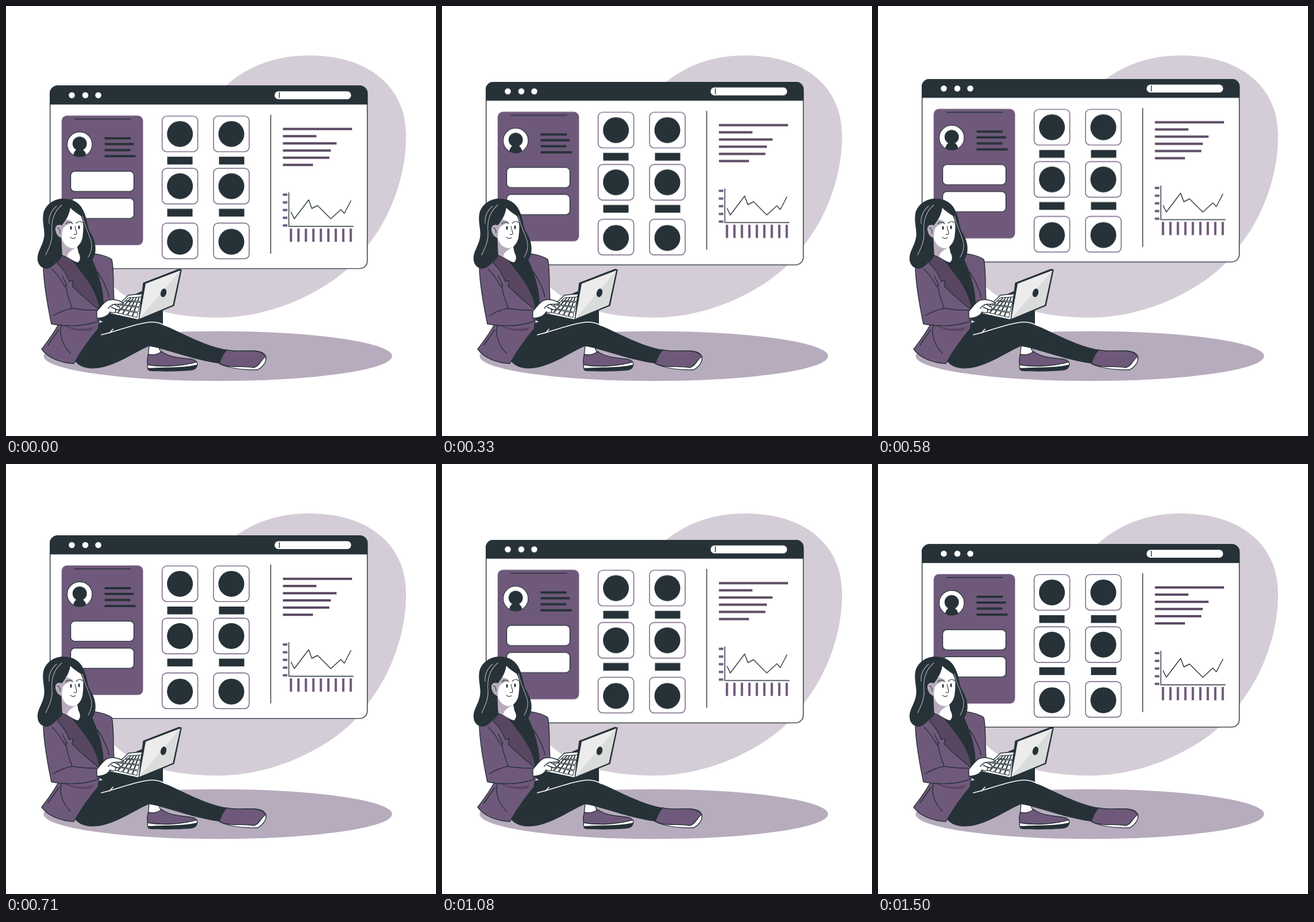
Recreate the animation shown at these times as an HTML page. Size 748 by 748 pixels, loop 1540 ms.

```html
<!DOCTYPE html>
<html lang="en">
<head>
<meta charset="utf-8">
<title>Social dashboard</title>
<style>
  html, body { margin: 0; width: 100%; height: 100%; overflow: hidden; background: #fff; }
  svg { display: block; width: 100vw; height: 100vh; }
  .dark { fill: #263238; }
  .plum { fill: #6f597b; }
  .deep { fill: #594762; }
  .mist { fill: #b7acbd; }
  .white { fill: #fff; }
  .ink { stroke: #263238; stroke-width: 1.4; stroke-linejoin: round; stroke-linecap: round; }
  .rim { fill: #fff; stroke: #6f597b; stroke-width: 1.4; }
  .line { fill: none; }
  .thin { stroke-width: 1.1; }
  .bar { stroke-width: 4; fill: none; }
  .shine { fill: none; stroke: #b7acbd; stroke-width: 1.1; stroke-linecap: round; }
</style>
</head>
<body>
<svg viewBox="0 0 748 748">
  <path fill="#d4cdd7" d="M382 139C425 101 475 86 528 86C630 86 696 140 696 225C696 300 666 370 632 413C592 480 478 542 370 542C290 542 225 525 187 488C150 450 150 300 382 139Z"/>
  <ellipse class="mist" cx="368.5" cy="609" rx="303" ry="43.3"/>

  <g id="panel">
    <rect class="white ink" x="76.7" y="140" width="551.8" height="317.6" rx="13"/>
    <path class="dark ink" d="M76.7 171.5V153A13 13 0 0 1 89.7 140H615.5A13 13 0 0 1 628.5 153V171.5Z"/>
    <g class="white">
      <circle cx="114.5" cy="156" r="5.3"/><circle cx="138" cy="156" r="5.3"/><circle cx="160.5" cy="156" r="5.3"/>
      <rect x="467.3" y="149.2" width="133" height="13.8" rx="6.6"/>
    </g>
    <path class="ink line" d="M475.5 151.5V160.5"/>

    <rect class="plum" x="96.8" y="191.5" width="141.6" height="225.3" rx="9"/>
    <path class="ink line" d="M119.5 197.5H217"/>
    <circle class="white ink thin" cx="128.2" cy="241.6" r="21.7"/>
    <circle class="dark" cx="128.2" cy="240.3" r="12.4"/>
    <path class="dark" d="M124 250H132C136 252 138.5 255 139.5 260.2A21.7 21.7 0 0 1 117 260.2C118 255 120 252 124 250Z"/>
    <path class="bar" stroke="#263238" d="M171.5 230.9H217M171.5 240.9H222.5M171.5 251.5H216.5M171.5 262H225.5"/>
    <rect class="white ink" x="112.5" y="288.4" width="110" height="35" rx="7"/>
    <rect class="white ink" x="112.5" y="335.4" width="110" height="35" rx="7"/>

    <g id="cards"></g>

    <path class="ink line" d="M460.5 190.5V431"/>
    <path id="list" class="bar" stroke="#594762"/>
    <path id="rows" class="bar" stroke="#6f597b"/>
    <path id="cols" class="bar" stroke="#6f597b"/>
    <path class="ink line" d="M492 325.5V384.3H604"/>
    <path class="ink line" d="M496 359.5L501.5 371L526.5 338L532 353L542 348L565 371L582.5 355L588.5 361.5L600 339.5"/>
  </g>

  <g id="woman">
    <!-- far leg and shoe -->
    <path class="dark" d="M160 545L186 530L273 529V556L262 600L248 592Z"/>
    <path class="white ink" d="M249 591L266 594L271 606L247 609Z"/>
    <path class="plum ink" d="M248 606C256 608 264 606 271 601C284 611 303 612 319 614C328 615 333 618 332 623C305 629 272 628 247 625C245 619 246 611 248 606Z"/>
    <path class="white ink" d="M246 624C274 629 308 626 332 619C334 624 332 629 328 630L250 633C246 631 246 628 246 624Z"/>
    <path class="dark" d="M246 630C274 628 306 630 332 624C333 630 329 633 322 634C298 636 272 636 250 635C247 634 246 632 246 630Z"/>

    <!-- near shoe and leg -->
    <path class="white ink" d="M371 622C390 632 416 633 437 633C446 629 454 619 452 610C449 603 441 600 430 600L384 604Z"/>
    <path class="plum ink" d="M371 622C373 610 377 601 384 598C398 602 414 599 428 600C440 600 449 604 452 610C443 615 441 627 431 629C412 625 390 631 371 622Z"/>
    <path class="dark" d="M116 612C128 590 142 570 160 552C186 542 216 548 246 546C259 545 269 549 276 556C308 569 346 592 385 598C379 604 374 614 372 622C333 617 292 602 250 591C222 603 190 627 158 630C139 632 124 627 116 612Z"/>
    <path d="M166 572C199 564 226 552 250 550C262 549 270 552 277 556M180 569L186 562" fill="none" stroke="#fff" stroke-width="1.5" stroke-linecap="round"/>

    <!-- body -->
    <path class="dark" d="M96 432L144 430C167 459 176 492 171 531L150 540L112 470Z"/>
    <path class="plum ink" d="M144 430C160 431 177 435 184 441C188 457 186 488 188 512L169 528C171 495 160 462 144 430Z"/>
    <path class="plum ink" d="M94 548C88 562 75 580 62 597C74 613 96 621 118 622C129 603 143 582 160 562L164 535Z"/>
    <path class="deep" d="M98 553C116 563 139 563 153 558L148 565C125 567 110 563 98 553Z"/>
    <path class="plum ink" d="M97 432C80 436 67 445 65 457C66 486 73 524 79 553C105 558 132 558 159 549L163 529C158 497 132 466 107 434Z"/>
    <path class="deep ink" d="M98 434C94 440 90 444 89 447C99 456 105 466 110 479L117 478L115 487C129 501 145 515 163 529C160 495 136 468 108 433Z"/>
    <path class="ink line" d="M104 485C105 502 112 515 115 526C130 528 145 530 157 529M82 539C93 532 103 528 115 526M80 458C88 464 96 477 103 489M98 470L106 486M96 556C92 575 100 592 112 604M92 563C83 575 77 584 73 590M159 462C168 476 176 490 179 506"/>

    <!-- head -->
    <path class="dark" d="M97 335C116 334 129 343 134 355C143 372 140 385 148 396C155 408 157 420 155 430C152 442 146 448 138 451L125 444L98 434C91 442 80 458 69 457C58 455 54 446 55 436C56 425 64 416 66 403C69 391 61 373 66 357C72 343 84 336 97 335Z"/>
    <path class="white" d="M97 400L98 433C107 435 116 444 125 446C130 442 130 436 126 429L123 414Z"/>
    <path class="mist" d="M96 399L98 433L107 435C107 428 116 424 122 420L112 416Z"/>
    <path class="white" d="M112 351C110 363 104 374 97 382C92 379 86 382 86 388C87 396 91 402 97 403C99 413 106 420 114 421C123 423 131 413 133 403C135 389 136 376 130 365C123 360 116 356 112 351Z"/>
    <path class="mist" d="M104 371C102 376 99 380 97 382C92 379 86 382 86 388C87 396 91 402 97 403C98 398 97 391 100 386C104 381 111 379 117 376C112 373 108 372 104 371Z"/>
    <path class="ink thin line" d="M89 386C93 386 94 390 94 395M104 379C107 375 113 375 116 379M122 378C126 374 130 374 133 377M120 383C121 389 123 393 123 396C122 398 120 398 118 397M112 402C114 405 118 405 121 403"/>
    <ellipse class="dark" cx="113" cy="386" rx="1.5" ry="3.2"/>
    <ellipse class="dark" cx="127" cy="385" rx="1.5" ry="3.2"/>
    <path class="shine" d="M97 346C84 357 78 373 80 394C81 410 74 422 69 433M133 365C137 386 147 399 149 414C150 423 147 430 143 437M88 348C78 357 74 366 75 378"/>

    <!-- laptop and hand -->
    <path class="dark" d="M216 505L241 494L239 506Z"/>
    <path class="white ink" d="M180 535L213 503L244 500L231 546Z"/>
    <path id="keys" class="white ink thin"/>
    <path class="dark ink" d="M239 482L301 458L305 459L292 521L231 546Z"/>
    <path fill="#ececec" d="M243 483L303 460L290 520L232 544Z"/>
    <path fill="#dadcdc" d="M303 460L290 520L232 544Z"/>
    <ellipse class="dark" cx="274" cy="499" rx="5" ry="7.6" transform="rotate(15 274 499)"/>
    <path class="white ink" d="M158 531C165 524 169 515 177 512C187 509 198 512 205 517C199 520 194 518 188 519L197 524C201 528 196 530 190 527C193 533 187 536 181 532C178 539 169 543 158 543Z"/>
    <path class="ink line" d="M188 519C184 520 180 523 178 526M190 527L183 524"/>
  </g>
</svg>
<script>
const $ = id => document.getElementById(id);
const setPath = (id, parts) => $(id).setAttribute('d', parts.join(''));
const range = n => [...Array(n).keys()];

// Icon cards; the last row's discs sit a little low
const card = (x, y, drop = 0) => `
  <rect class="rim" x="${x - 31}" y="${y - 31}" width="62" height="62" rx="8"/>
  <circle class="dark" cx="${x}" cy="${y + drop}" r="22.5"/>`;
const label = (x, y) => `<rect class="dark" x="${x}" y="${y}" width="44" height="13.5"/>`;
$('cards').innerHTML = [302.6, 392].map((x, i) =>
  card(x, 223.4) + card(x, 314.2) + card(x, 409.5, 1.4) +
  [263, 353.6].map(y => label(280.5 + 90 * i, y)).join('')).join('');

// Text bars and chart ticks
setPath('list', [602, 540, 575, 565, 562.5, 534].map((x, i) => `M481.7 ${214.7 + 12.5 * i}H${x}`));
setPath('rows', range(5).map(i => `M481.5 ${329 + 13.4 * i}H489.5`));
setPath('cols', range(9).map(i => `M${495.7 + 13 * i} 388V411`));

// Keyboard cells laid out on a slanted quad
const key = (u, v) => {
  const left = 186 + 29 * v, right = 229 + 8 * v;
  const x = left + (right - left) * u;
  const y = 532 - 26 * v + (10 - 12 * v) * u;
  return `${x.toFixed(1)} ${y.toFixed(1)}`;
};
setPath('keys', range(20).map(n => {
  const u = (n % 5) / 5, v = Math.floor(n / 5) / 4;
  return `M${key(u, v)}L${key(u + .17, v)}L${key(u + .17, v + .2)}L${key(u, v + .2)}Z`;
}));

// The panel floats up and down at 24 pictures a second
const LOOP = 1540, COUNT = 37, RISE = 15, HALF = 18;
const lift = k => {
  if (k > 32) return -2.5 * (36 - k) / 4;
  return -RISE * (1 - Math.abs(k + 1 - HALF) / HALF);
};
const steps = range(COUNT).map(k => ({
  offset: Math.round(k * 100 / 24) * 10 / LOOP,
  transform: `translateY(${lift(k).toFixed(2)}px)`,
  easing: 'steps(1, end)'
}));
steps.push({ offset: 1, transform: steps[COUNT - 1].transform });
$('panel').animate(steps, { duration: LOOP, iterations: Infinity });
</script>
</body>
</html>
```
